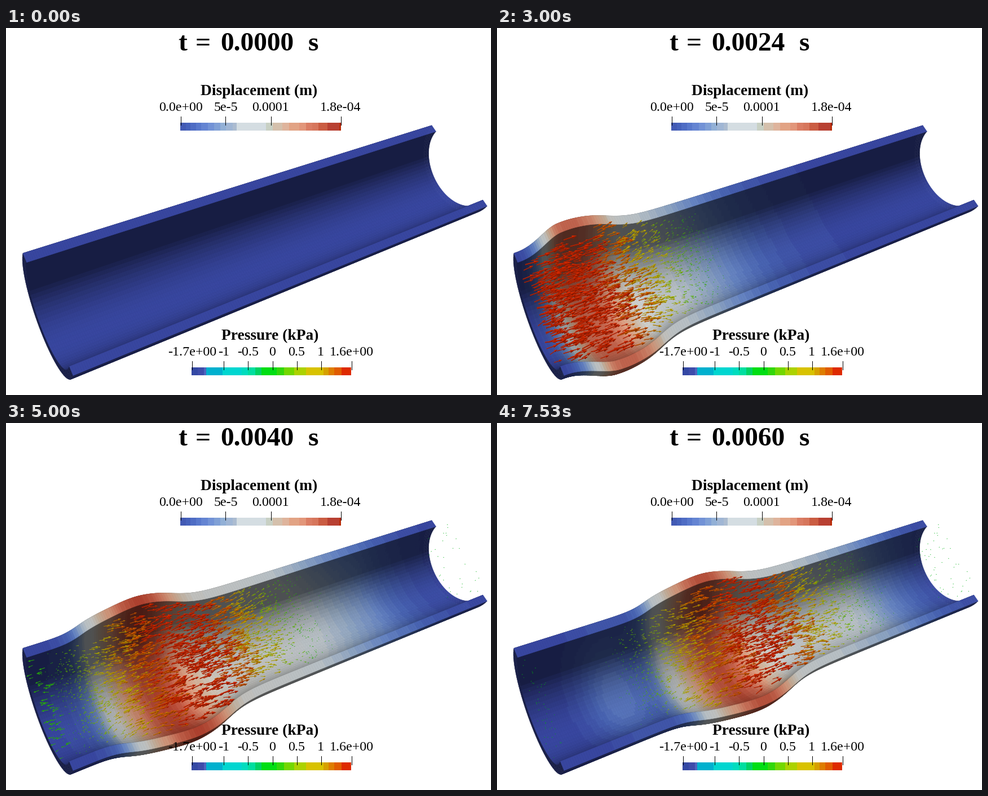
A matplotlib script for the animation above (8000 ms loop, 860 by 651 pixels).

```python
import numpy as np
import matplotlib.pyplot as plt
from matplotlib.animation import FuncAnimation
from matplotlib.collections import PolyCollection
from matplotlib.colors import to_rgb
from matplotlib.patches import Rectangle

W, H, DPI = 860, 651, 100
STEPS, STEP_MS = 16, 500
WALL = 0.85          # inner radius / outer radius
DARK = 0.42          # ambient light

# Colour bands: left edges in pixels (plus the final right edge) and colours
DISP_X = [309, 319, 327, 337, 346, 358, 369, 380, 390, 402, 409, 461, 473,
          490, 502, 520, 532, 543, 554, 570, 591, 594]
DISP_C = """#425ab4 #4662bc #4e6cc4 #5878cc #6484d2 #7292d6 #80a0d6 #92b0d6
#a0b6d4 #acbcd0 #d4dde2 #c8d0c4 #d4c0ac #deb49c #e2a384 #e2967a #da7d64
#d6765c #ca5c42 #b84032 #b92d0a""".split()
PRES_X = [329, 340, 351, 355, 384, 418, 429, 442, 453, 480, 493, 511, 532,
          563, 572, 582, 595, 612]
PRES_C = """#3448a4 #3e4caa #5064be #00b0ce #00d6d0 #00dcbe #00dea0 #00d264
#00de14 #32d70a #73d700 #acd200 #d8c200 #d6a000 #de7d00 #e05c00
#de2a00""".split()

PRES_RGB = np.array([to_rgb(c) for c in PRES_C])

SURF_POS = [0, .1, .2, .3, .4, .52, .6, .7, .8, .9, 1]
SURF_RGB = np.array([
    (62, 78, 177), (80, 110, 197), (112, 145, 214), (155, 180, 213),
    (203, 212, 218), (212, 214, 212), (213, 190, 168), (227, 163, 133),
    (217, 120, 94), (196, 80, 58), (180, 50, 36)]) / 255


def surf_color(c):
    c = np.round(np.clip(c, 0, 1) * 40) / 40
    return np.stack([np.interp(c, SURF_POS, ch) for ch in SURF_RGB.T], -1)


def pres_color(p):
    edges = (np.array(PRES_X) - PRES_X[0]) / (PRES_X[-1] - PRES_X[0])
    return PRES_RGB[np.clip(np.searchsorted(edges, p) - 1, 0, len(PRES_C) - 1)]


def rise(x, at, width):
    return 0.5 * (1 + np.tanh((x - at) / width))


def smooth(x):
    x = np.clip(x, 0, 1)
    return x * x * (3 - 2 * x)


# Projected half tube: centre line and the two axes of the outer ellipse
def lerp(a, b, s):
    return np.array(a) + (np.array(b) - np.array(a)) * s[..., None]


def centre(s):
    return lerp((74.5, 508), (804, 244.3), s)


def spoke(s, th):
    u = lerp((44.5, 108.5), (49, 71.5), s)
    v = lerp((-9, 39.6), (-41.5, 44.5), s)
    return v * np.sin(th)[..., None] - u * np.cos(th)[..., None]


def tube(s, th, radius):
    return centre(s) + spoke(s, th) * radius[..., None]


def axis_x(s):
    return 30 + 725 * s


def pulse_shape(x, k):
    """Wall pulse: clamp at the inlet, opening behind, slow climb to the crest."""
    tail = 132 + 27 * (k - 10)
    hold = smooth((x - 30) / 88)
    back = rise(x, tail, 30)
    climb = smooth((x - tail - 15) / 105)
    return tail, hold, back, climb


def bulge_at(s, k):
    x = axis_x(s)
    _, hold, back, climb = pulse_shape(x, k)
    crest = 0.66 * back + 0.34 * climb
    return 29.5 * min(1, k / 3) * hold * crest * (1 - rise(x, 50 + 25 * k, 38))


def displacement(s, th, k):
    """Displacement magnitude, 0 to 1: radial bulge, axial lead, faint wake."""
    x = axis_x(s)
    tail, hold, back, climb = pulse_shape(x, k)
    radial = min(0.75, 0.5 + 0.03 * k) * bulge_at(s, k) / 28
    reach = min(220 + 53 * (k - 4), 610) + 6 * k * np.sin(th)
    axial = (min(0.55, 0.38 + 0.018 * k) * min(1, k / 3) * hold * back
             * (0.55 + 0.45 * climb) * (1 - rise(x, reach, 50 + 10 * k))
             * np.clip((775 - x) / 150, 0, 1))
    wake = (0.02 * max(k - 7, 0) * hold * (0.3 + 0.7 * np.sin(th) ** 2)
            * np.exp(-((x - tail + 86) / 55) ** 2))
    return np.hypot(radial, axial) + wake


def quads(p):
    q = np.stack([p[:-1, :-1], p[:-1, 1:], p[1:, 1:], p[1:, :-1]], 2)
    return q.reshape(-1, 4, 2)


NS, NT = 180, 40
s_line = np.linspace(0, 1, NS + 1)
th_line = np.linspace(0, np.pi, NT + 1)
TH, S = np.meshgrid(th_line, s_line, indexing="ij")
S_MID = (s_line[1:] + s_line[:-1]) / 2
TH_MID = ((th_line[1:] + th_line[:-1]) / 2)[:, None]
LIGHT = np.cos(TH_MID - np.radians(108))


def tube_mesh(k):
    grow = bulge_at(s_line, k) / (117 - 30 * s_line)
    outer = tube(S, TH, np.broadcast_to(1 + grow, S.shape))
    inner = tube(S, TH, np.broadcast_to(WALL + grow, S.shape))

    base = surf_color(displacement(S_MID, TH_MID, k))
    rim = surf_color(displacement(S_MID, 0, k)) * 0.9
    slope = np.gradient(bulge_at(S_MID, k), axis_x(S_MID))
    shade = 0.9 * np.clip(LIGHT - 0.35 * slope, DARK, 1.08)

    verts = [quads(outer), quads(inner)]
    colors = [(base * 0.4).reshape(-1, 3),
              (base * shade[..., None]).reshape(-1, 3)]
    for row in (0, -1):
        verts.append(quads(np.stack([outer[row], inner[row]])))
        colors.append(rim)
    return np.concatenate(verts), np.clip(np.concatenate(colors), 0, 1)


# Flow arrows at fixed random points of the fluid
N = 3300
rng = np.random.default_rng(4)
a_s = rng.uniform(0, 1, N)
a_th = rng.uniform(-np.pi, np.pi, N)
a_rho = 0.92 * np.sqrt(rng.uniform(0, 1, N))
a_size = rng.uniform(0.6, 1.15, N)
a_turn = rng.normal(0, 0.12, N)
a_pick = rng.uniform(0, 1, N)

ARROW = np.array([(0, -.035), (.65, -.035), (.65, -.13), (1, 0),
                  (.65, .13), (.65, .035), (0, .035)])
SHADOW = np.array([(0, 0), (1, 0), (1, 0), (1, 0),
                   (.65, .13), (.65, .035), (0, .035)])


def unit(v):
    return v / np.maximum(np.linalg.norm(v, axis=-1, keepdims=True), 1e-9)


def flow_arrows(k):
    x = axis_x(a_s)
    front = np.interp(k, [0, 4, 8, 10, 12, 15], [-60, 140, 320, 395, 450, 515])
    tail = 85 + 27 * (k - 8) if k > 7 else -300
    lag = min(10, 35 * (k - 8) - 60)
    press = (0.52 + min(0.46, 0.37 + 0.014 * k)
             * rise(x, tail, 70) * (1 - rise(x, front, 60)))
    speed = rise(x, tail + lag, 65) * (1 - rise(x, front, 65))

    radius = a_rho * (WALL + bulge_at(a_s, k) / (117 - 30 * a_s))
    start = tube(a_s, a_th, radius)
    arm = spoke(a_s, a_th) * a_rho[:, None]
    along = unit(tube(a_s + 0.01, a_th, radius) - start)
    spread = (0.3 * np.exp(-((x - front - 20) / 70) ** 2)
              - 0.25 * np.exp(-((x - tail + 20) / 50) ** 2))
    way = unit(along + spread[:, None] * arm / 80)

    length = 24 * speed * a_size * (1 - 0.26 * a_s)
    if k >= 9:  # backflow at the inlet
        inlet = a_s < 0.015
        way[inlet] *= -1
        length[inlet] = 11 * np.exp(-(k - 10) / 2.5) * a_size[inlet]
    outlet = (a_s > 0.96) & (a_pick < (k - 6) / 30)
    length[outlet] = np.maximum(length[outlet], 1.3)

    cos, sin = np.cos(a_turn), np.sin(a_turn)
    way = np.stack([way[:, 0] * cos - way[:, 1] * sin,
                    way[:, 0] * sin + way[:, 1] * cos], -1)
    side = np.stack([-way[:, 1], way[:, 0]], -1)
    show = (length > 0.9) & (k > 0)
    start, way, side, length = start[show], way[show], side[show], length[show]
    thick = np.maximum(length, 7)

    def place(shape):
        return (start[:, None]
                + way[:, None] * shape[:, :1] * length[:, None, None]
                + side[:, None] * shape[:, 1:] * thick[:, None, None])

    verts = np.stack([place(ARROW), place(SHADOW)], 1).reshape(-1, 7, 2)
    rgb = pres_color(press[show])
    return verts, np.stack([rgb * 0.95, rgb * 0.58], 1).reshape(-1, 3)


fig = plt.figure(figsize=(W / DPI, H / DPI), dpi=DPI, facecolor="white")
ax = fig.add_axes([0, 0, 1, 1])
ax.set_xlim(0, W)
ax.set_ylim(H, 0)
ax.axis("off")


def label(x, y, text, px, weight="normal", ha="center"):
    return ax.text(x, y, text, fontsize=px * 72 / DPI, family="Liberation Serif",
                   weight=weight, ha=ha, va="baseline", color="black", zorder=5)


def legend(title, cx, top, edges, colors, ticks):
    label(cx, top - 49, title, 27.5, "bold")
    for x0, x1, c in zip(edges, edges[1:], colors):
        ax.add_patch(Rectangle((x0, top), x1 - x0, 14, fc=c, lw=0, zorder=3,
                               antialiased=False))
    for x, text_x, text in ticks:
        ax.plot([x, x], [top - 11, top + 4], color="black", lw=0.72, zorder=4)
        label(text_x, top - 21, text, 24)


legend("Displacement (m)", 448.5, 168, DISP_X, DISP_C,
       [(309.5, 310, "0.0e+00"), (388.5, 389.5, "5e-5"),
        (469.5, 468.5, "0.0001"), (593.5, 593.5, "1.8e-04")])
legend("Pressure (kPa)", 468.5, 602, PRES_X, PRES_C,
       [(329.5, 330, "-1.7e+00"), (385.5, 386, "-1"), (428.5, 429.5, "-0.5"),
        (472.5, 472, "0"), (515.5, 515.5, "0.5"), (558.5, 558, "1"),
        (612.5, 613, "1.6e+00")])

for tx, word in ((305, "t"), (336, "="), (536, "s")):
    label(tx, 40, word, 47.5, "bold", "left")
clock = label(380, 40, "", 47.5, "bold", "left")

wall = PolyCollection([], edgecolors="face", linewidths=0.4, zorder=1)
arrows = PolyCollection([], edgecolors="none", zorder=2)
ax.add_collection(wall, autolim=False)
ax.add_collection(arrows, autolim=False)


def update(k):
    for coll, (verts, colors) in ((wall, tube_mesh(k)), (arrows, flow_arrows(k))):
        coll.set_verts(verts)
        coll.set_facecolor(colors)
    clock.set_text(f"{0.0004 * k:.4f}")
    return wall, arrows, clock


anim = FuncAnimation(fig, update, frames=STEPS, interval=STEP_MS,
                     repeat=True, repeat_delay=0, blit=False)
plt.show()
```
